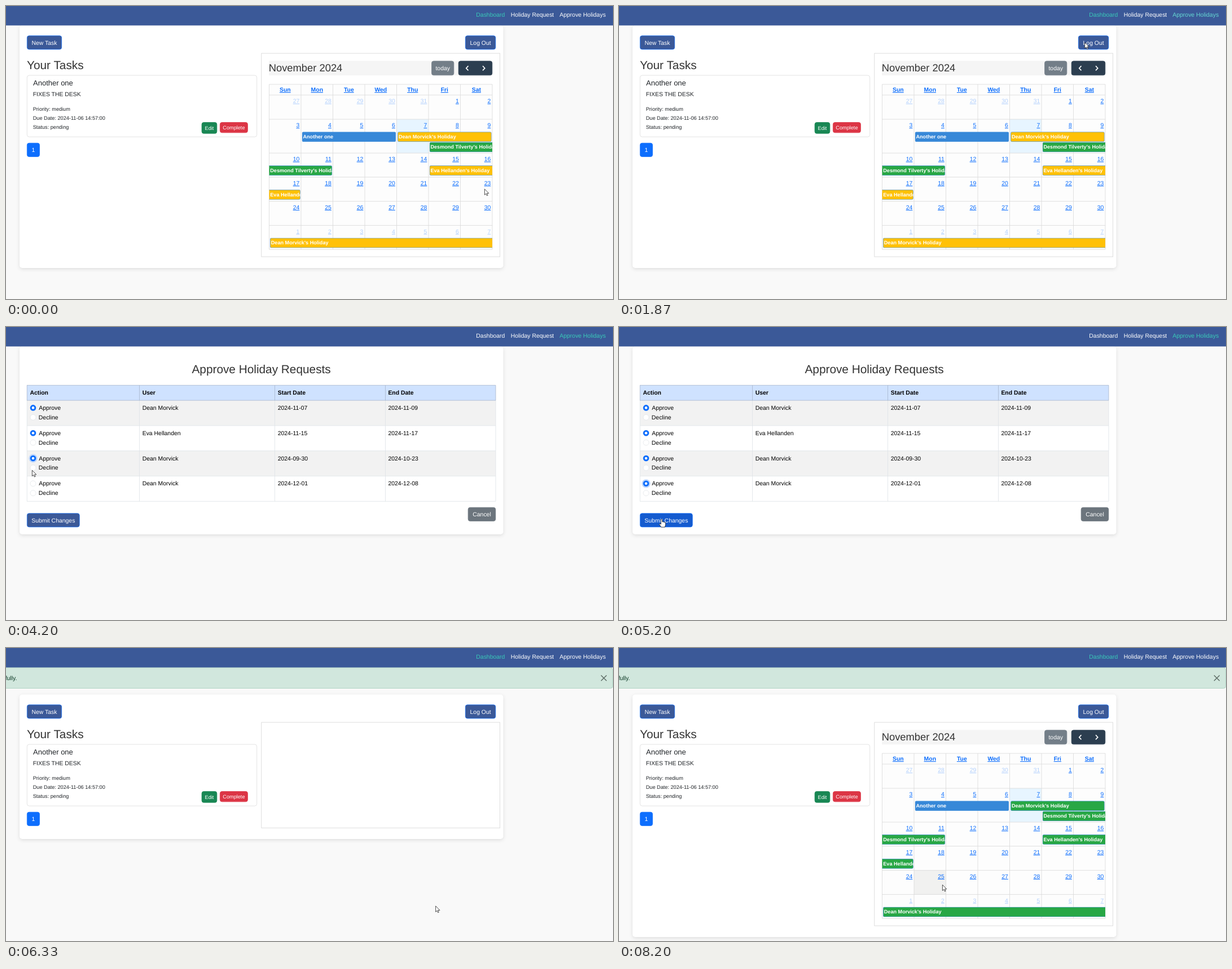
An HTML page for the animation above (9.27 s loop, 1076 by 520 pixels).

```html
<!DOCTYPE html>
<html lang="en">
<head>
<meta charset="utf-8">
<title>Holiday approval</title>
<style>
  html, body { margin: 0; width: 100%; height: 100%; overflow: hidden; background: #f9f9f9; }
  #stage { display: block; width: 100vw; height: 100vh; font-family: "Liberation Sans", Arial, sans-serif; text-rendering: geometricPrecision; }
  .card { fill: #fff; filter: drop-shadow(0 2px 3px rgba(0, 0, 0, .11)); }
</style>
</head>
<body>
<svg id="stage" viewBox="0 0 1076 520"></svg>
<script>
const LOOP = 9270, FPS = 15, BASE = 10.45, SMALL = 9.17, HEADING = 20.8;
const BRAND = '#3b5998', LINK = '#0d6efd', GREEN = '#28a745', YELLOW = '#ffc107', TEAL = '#3acab8';
const DEAN = 'Dean Morvick', DESMOND = 'Desmond Tilverty', EVA = 'Eva Hellanden';
const $ = id => document.getElementById(id);

const text = (x, y, s, size = BASE, fill = '#212529', attrs = '') =>
  `<text x="${x}" y="${y}" font-size="${size}" fill="${fill}" ${attrs}>${s}</text>`;
const rect = (x, y, w, h, fill, attrs = '') =>
  `<rect x="${x}" y="${y}" width="${w}" height="${h}" fill="${fill}" ${attrs}/>`;
const path = (d, stroke, width = .7, attrs = '') =>
  `<path d="${d}" fill="none" stroke="${stroke}" stroke-width="${width}" ${attrs}/>`;
const button = (x, y, w, h, fill, label, stroke = fill, size = BASE, id = '') =>
  rect(x + .35, y + .35, w - .7, h - .7, fill, `rx="3.6" stroke="${stroke}" stroke-width=".7" id="${id}"`) +
  text(x + w / 2, y + h / 2 + size * .35, label, size, '#fff', 'text-anchor="middle"');

// Calendar
const COLS = [...Array(8)].map((_, i) => 466.5 + i * 56.5);
const ROWS = [158, 201, 261, 303.7, 346.6, 389.4];

function event(x, y, w, label, fill, openLeft, openRight) {
  const left = openLeft ? -5 : .35, right = openRight ? w + 5 : w - .35;
  return `<svg x="${x}" y="${y}" width="${w}" height="17.7">` +
    rect(left, .35, right - left, 17, fill, 'rx="2" stroke="#3788d8" stroke-width=".7"') +
    text(1.8, 11.8, label, 9.1, '#fff', 'font-weight="bold"') + '</svg>';
}

function calendar() {
  const holiday = name => name + "'s Holiday", pending = 'var(--pending)';
  let out = rect(466, 97.4, 396, 25.8, '#f5f5f5') + text(465.7, 116.4, 'November 2024', 18.37, '#333') +
    button(754.2, 97.4, 40, 25.8, '#737e88', 'today') + button(801.8, 97.4, 60.4, 25.8, '#2c3e50', '') +
    path('M819.5 106.4l-3.8 4 3.8 4M845 106.4l3.8 4-3.8 4', '#fff', 1.6) +
    rect(466.5, 139, 395.5, 292.7, '#fdfdfd') + rect(692.5, 201, 56.5, 60, '#e7f5ff') +
    rect(523, 346.6, 56.5, 42.8, '#f1f1f0', 'id="hovered"') +
    path(COLS.map(x => `M${x} 139V432`).join('') +
      [139, ...ROWS, 432].map(y => `M466.5 ${y}H862`).join(''), '#d9d9d9', .8);
  ['Sun', 'Mon', 'Tue', 'Wed', 'Thu', 'Fri', 'Sat'].forEach((day, i) =>
    out += text(COLS[i] + 28.3, 152, day, BASE, LINK, 'font-weight="bold" text-anchor="middle" text-decoration="underline"'));
  for (let i = 0; i < 42; i++) {
    const date = new Date(2024, 9, 27 + i), dim = date.getMonth() === 10 ? 1 : .3;
    out += text(COLS[i % 7 + 1] - 2.7, ROWS[i / 7 | 0] + 14.2, date.getDate(), BASE, LINK,
      `text-anchor="end" text-decoration="underline" opacity="${dim}"`);
  }
  return out + event(524.7, 223.3, 166.5, 'Another one', '#3788d8') +
    event(694.2, 223.3, 166.5, holiday(DEAN), pending) +
    event(750.7, 241.6, 111.3, holiday(DESMOND), GREEN, false, true) +
    event(466.5, 283.1, 111.7, holiday(DESMOND), GREEN, true) +
    event(750.7, 283.1, 111.3, holiday(EVA), pending, false, true) +
    event(466.5, 326, 55.3, holiday(EVA), pending, true) +
    event(468, 411.6, 394, holiday(DEAN), pending, false, true);
}

const dashboard = () =>
  rect(24, 34.5, 857.5, 430.5, '#fff', 'class="card" rx="5" id="card"') +
  button(37, 52.4, 62, 24.9, BRAND, 'New Task', LINK) + button(814, 52.4, 54.2, 24.9, BRAND, 'Log Out', LINK) +
  text(37, 112.2, 'Your Tasks', HEADING, '#333') +
  rect(37.3, 123, 407.4, 109.3, '#fff', 'rx="4" stroke="#dcdcdc" stroke-width=".8"') +
  text(48, 141, 'Another one', 13) + text(47.7, 160.4, 'FIXES THE DESK') +
  text(47.7, 186.4, 'Priority: medium', SMALL) + text(47.7, 202.1, 'Due Date: 2024-11-06 14:57:00', SMALL) +
  text(47.7, 217.8, 'Status: pending', SMALL) +
  button(346.7, 206.2, 27.5, 20.4, '#198754', 'Edit', '#198754', SMALL) +
  button(379, 206.2, 49.8, 19, '#dc3545', 'Complete', '#dc3545', SMALL) +
  button(37, 242.9, 22.9, 24.9, LINK, '1') +
  rect(452.8, 84, 422.8, 361, '#fff', 'stroke="#d9d9d9" stroke-width=".9" id="frame"') +
  `<g id="calendar">${calendar()}</g>`;

// Approval page
const REQUESTS = [[DEAN, '2024-11-07', '2024-11-09'], [EVA, '2024-11-15', '2024-11-17'],
  [DEAN, '2024-09-30', '2024-10-23'], [DEAN, '2024-12-01', '2024-12-08']];
const CHECKED_AT = [2800, 3333, 3930, 4500];
const dot = (y, r, fill, attrs = '') => `<circle cx="48" cy="${y}" r="${r}" fill="${fill}" ${attrs}/>`;

function approval() {
  const cellX = [42.5, 241.7, 481.7, 677.4];
  let out = rect(24, 34.5, 857.5, 333.5, '#fff', 'class="card" rx="5"') +
    text(452.6, 82.3, 'Approve Holiday Requests', HEADING, '#333', 'text-anchor="middle"') +
    rect(37.3, 103.4, 830.7, 26.8, '#cfe2ff');
  ['Action', 'User', 'Start Date', 'End Date'].forEach((s, i) =>
    out += text(cellX[i], 120.2, s, BASE, '#000', 'font-weight="bold"'));
  REQUESTS.forEach((request, i) => {
    const y = 130.2 + i * 44.8, top = y + 13.2, low = y + 30.1;
    const empty = 'stroke="#dee2e6" stroke-width=".7"';
    out += rect(37.3, y, 830.7, 44.8, i % 2 ? '#fff' : '#f2f2f2') +
      dot(top, 7.6, '#bcd6fd', `id="ring${i}"`) + dot(top, 5, '#fff', empty) + dot(low, 5, '#fff', empty) +
      `<g id="check${i}">${dot(top, 5.3, LINK)}${dot(top, 2.3, '#fff')}</g>` +
      text(58.2, y + 16.7, 'Approve', BASE, '#000') + text(57.8, y + 33.5, 'Decline', BASE, '#000');
    request.forEach((s, j) => out += text(cellX[j + 1], y + 16.7, s, BASE, '#000'));
  });
  const dividers = [37.3, 236.5, 476.5, 672.5, 868];
  return out + path(dividers.map(x => `M${x} 130V309.4`).join('') +
      [175, 219.8, 264.6, 309.4].map(y => `M37 ${y}H868`).join(''), '#dee2e6', .8) +
    path(dividers.map(x => `M${x} 103.4V130.2`).join('') + 'M37 103.4H868M37 130.2H868', '#a6b5cc', .8) +
    button(37, 330.4, 93.6, 24.9, BRAND, 'Submit Changes', LINK, BASE, 'submit') +
    button(818.8, 319.9, 49.4, 24.9, '#6c757d', 'Cancel');
}

$('stage').innerHTML =
  rect(0, 0, 1076, 520, '#f9f9f9') +
  `<g id="approval">${approval()}</g><g id="dashboard">${dashboard()}</g>` +
  '<g id="alert">' + rect(-5, 34.8, 1080.6, 36.7, '#d1e7dd', 'rx="4" stroke="#a3cfbb" stroke-width=".8"') +
  text(19.3, 56.6, 'successfully.', BASE, '#0a3622', 'text-anchor="end"') +
  path('M1054.8 48.4l9.8 9.8m0-9.8l-9.8 9.8', '#5c6b64', 1.4) + '</g>' +
  rect(0, 0, 1076, 34.5, BRAND) +
  text(833.3, 19.4, 'Dashboard', BASE, '#fff', 'id="navDash"') + text(894.7, 19.4, 'Holiday Request', BASE, '#fff') +
  text(981.3, 19.4, 'Approve Holidays', BASE, '#fff', 'id="navApprove"') +
  '<g id="cursor" fill="#fff" stroke="#222" stroke-width=".8" stroke-linejoin="round">' +
  '<path id="arrow" d="M.4.2V10.6L2.8 8.4 4.4 12 6.1 11.2 4.5 7.8H7.8Z"/>' +
  '<path id="hand" d="M-1.2 8V.8Q0-.8 1.2.8V5Q2.4 4 3.4 5.2 4.7 4.5 5.4 5.8 7 5.4 7 7.2V10L5.8 14.2H-.6L-4 9.2Q-3.6 7.2-1.2 9Z"/></g>';

// Pointer track: time, x, y
const TRACK = [[0, 848, 324.6], [400, 770, 231], [650, 712, 300], [930, 693, 409], [1530, 1020, 14],
  [1733, 1020, 14], [1867, 826, 64.5], [2670, 45, 140], [2867, 45, 140], [3000, 47, 162], [3133, 44, 184],
  [3400, 44, 184], [3800, 46, 230], [3930, 46, 231], [4200, 46, 254], [4430, 46, 275], [4600, 46, 276],
  [5130, 75.5, 341], [5270, 75.5, 341], [5470, 76, 344], [5600, 76, 344], [6333, 760, 457.5],
  [6530, 942, 471], [6800, 470, 400], [7067, 695, 290], [7467, 920, 245], [7800, 470, 447],
  [8200, 573, 420], [LOOP, 573, 420]];
const HAND = [[350, 470], [1400, 1800], [4950, 5700], [7000, 7140]];

// Hermite curve that rests at turning points
function slope(i, axis) {
  const a = TRACK[i - 1], b = TRACK[i], c = TRACK[i + 1];
  if (!a || !c || (b[axis] - a[axis]) * (c[axis] - b[axis]) <= 0) return 0;
  return (c[axis] - a[axis]) / (c[0] - a[0]);
}
function pointer(t, axis) {
  const i = Math.max(1, TRACK.findIndex(k => k[0] >= t)), a = TRACK[i - 1], b = TRACK[i];
  const d = b[0] - a[0], u = (t - a[0]) / d, v = 1 - u;
  return a[axis] * v * v * (1 + 2 * u) + b[axis] * u * u * (1 + 2 * v) +
    d * u * v * (slope(i - 1, axis) * v - slope(i, axis) * u);
}

const show = (id, on) => $(id).style.display = on ? '' : 'none';
const set = (id, name, value) => $(id).setAttribute(name, value);

function render(now) {
  const t = Math.floor((now % LOOP + 4) * FPS / 1000) * 1000 / FPS + 1;
  const approving = t >= 1930 && t < 5865, done = t >= 5865, loading = done && t < 6460;
  show('approval', approving);
  show('dashboard', !approving);
  show('alert', done);
  show('calendar', !loading);
  show('hovered', t > 7950);
  set('dashboard', 'transform', `translate(0 ${done ? 48 : 0})`);
  set('card', 'height', loading ? 256.5 : 430.5);
  set('frame', 'height', loading ? 187.3 : 361);
  $('stage').style.setProperty('--pending', done ? GREEN : YELLOW);
  set('navDash', 'fill', approving ? '#fff' : TEAL);
  set('navApprove', 'fill', approving ? TEAL : t > 1450 && !done ? '#66d9d3' : '#fff');
  set('submit', 'fill', t < 4950 ? BRAND : t < 5260 ? '#145bcf' : '#0a58ca');
  CHECKED_AT.forEach((at, i) => {
    show('check' + i, t >= at);
    show('ring' + i, t >= at && t < (CHECKED_AT[i + 1] || 5260));
  });
  const hand = HAND.some(([from, to]) => t >= from && t < to);
  show('hand', hand);
  show('arrow', !hand);
  set('cursor', 'transform', `translate(${pointer(t, 1)} ${pointer(t, 2)})`);
}

const start = performance.now();
(function tick() {
  render(performance.now() - start);
  requestAnimationFrame(tick);
})();
</script>
</body>
</html>
```
